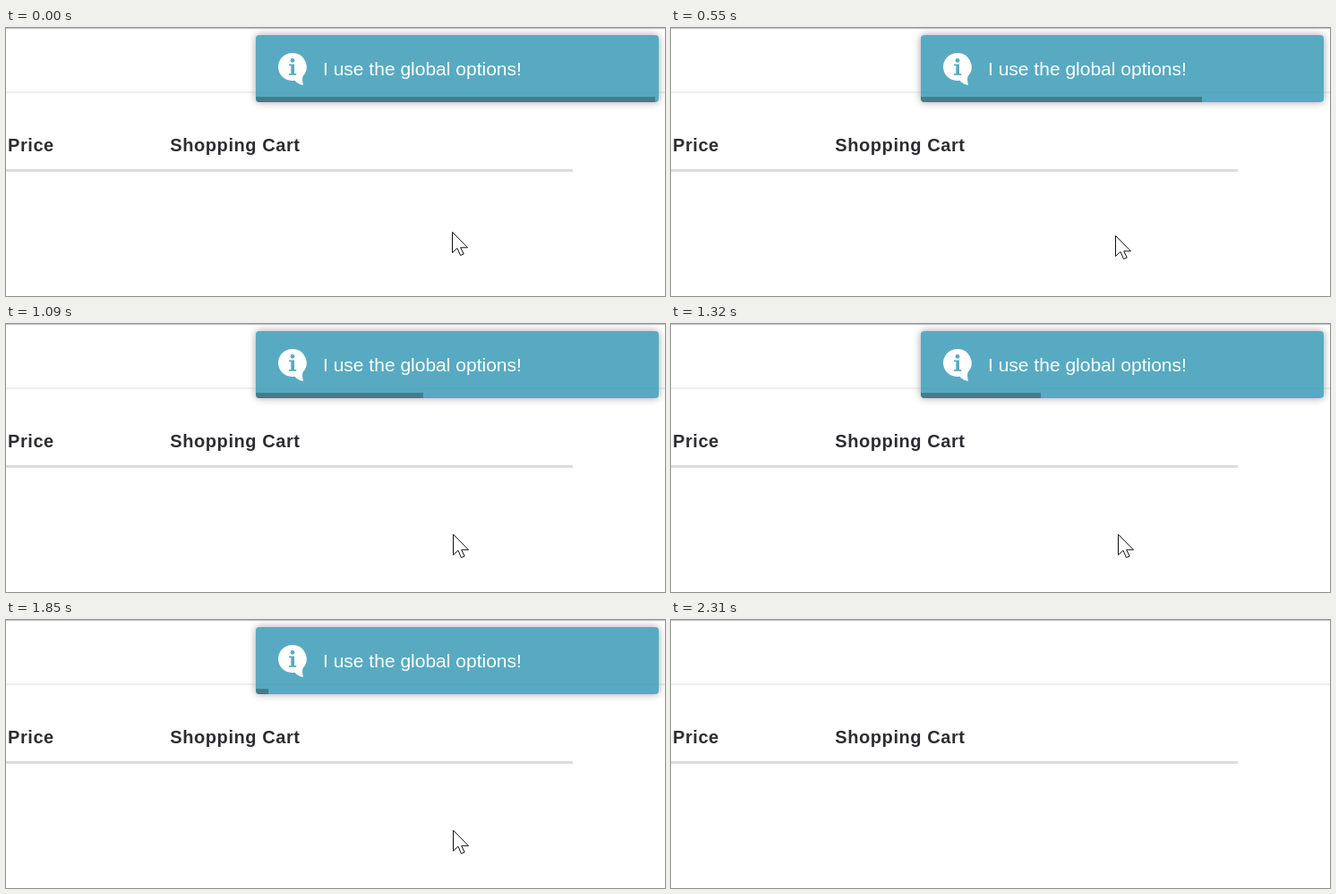
Write an HTML page that moves like this. It is 736 px wide and 300 px high and loops after 2.7 s.

```html
<!DOCTYPE html>
<html lang="en">
<head>
<meta charset="utf-8">
<title>Toast with progress bar</title>
<style>
  html, body { margin: 0; width: 100%; height: 100%; overflow: hidden; background: #fff; }
  #stage {
    position: relative; width: 736px; height: 300px; overflow: hidden;
    font: 21px/30px "Liberation Sans", Arial, sans-serif;
  }
  #stage > *, #toast > * { position: absolute; white-space: nowrap; }
  .rule { left: 0; width: 736px; }
  .head { top: 116px; font-size: 20px; font-weight: 700; letter-spacing: .58px; color: #2d2d32; }
  #toast {
    left: 279px; top: 8px; width: 450px; height: 75px; overflow: hidden;
    border-radius: 4px; background: #2f96b4; box-shadow: 0 0 9px #888; opacity: .8; color: #fff;
  }
  #toast span { left: 75px; top: 23px; }
  #bar { left: 0; bottom: 0; height: 6px; background: #000; opacity: .4; }
  #cursor { left: 0; top: 0; }
</style>
</head>
<body>
<div id="stage">
  <div class="rule" style="top:0;height:1px;background:#c3c3c3"></div>
  <div class="rule" style="top:71px;height:2px;background:#eee"></div>
  <div class="rule" style="top:158px;height:3px;width:633px;background:#ddd"></div>
  <div class="head" style="left:2px">Price</div>
  <div class="head" style="left:183.3px">Shopping Cart</div>
  <div id="toast">
    <svg width="36" height="40" style="left:24px;top:19px">
      <path d="M17 1a15.5 15.5 0 0 1 11.5 26q-1 5 .5 10-6-1-9.5-5.3A15.5 15.5 0 1 1 17 1z" fill="#fff"/>
      <g fill="#2f96b4">
        <circle cx="17" cy="9.3" r="2.4"/>
        <path d="M13 13.5h6V24h2.3v1.8H13V24h2.3v-8.7H13z"/>
      </g>
    </svg>
    <span>I use the global options!</span>
    <div id="bar"></div>
  </div>
  <svg id="cursor" width="20" height="29">
    <path d="M.5.5v23l5.5-5 3.5 8 3.7-1.5-3.5-7.2h7.8z" fill="#fff" stroke="#111"/>
  </svg>
</div>
<script>
  const LOOP = 2700, STEP = 77;
  const SWEEP_STEPS = 7.4, DRIFT_STEPS = 12, HIDE_STEP = 25, EXIT_STEP = 26;

  const [toast, bar, cursor] = ["toast", "bar", "cursor"].map(id => document.getElementById(id));

  // Sweep left and back, settle slowly, then speed away past the bottom edge
  function cursorAt(k) {
    const sweep = Math.sin(Math.PI * Math.min(1, k / SWEEP_STEPS)) ** 2;
    const drift = Math.min(1, k / DRIFT_STEPS);
    const exit = Math.max(0, k - EXIT_STEP) ** 2;
    return [498 + drift - 93 * sweep + 14 * exit, 228 + 7 * drift - 8 * sweep + 6 * exit];
  }

  function draw(now) {
    const k = Math.floor(now % LOOP / STEP);
    const [x, y] = cursorAt(k).map(Math.round);
    toast.style.display = k < HIDE_STEP ? "block" : "none";
    bar.style.width = Math.max(0, Math.round(446 - 19.2 * k + 0.05 * k * k)) + "px";
    cursor.style.transform = `translate(${x}px, ${y}px)`;
  }

  const start = performance.now();
  function frame() {
    draw(performance.now() - start);
    requestAnimationFrame(frame);
  }
  frame();
</script>
</body>
</html>
```
